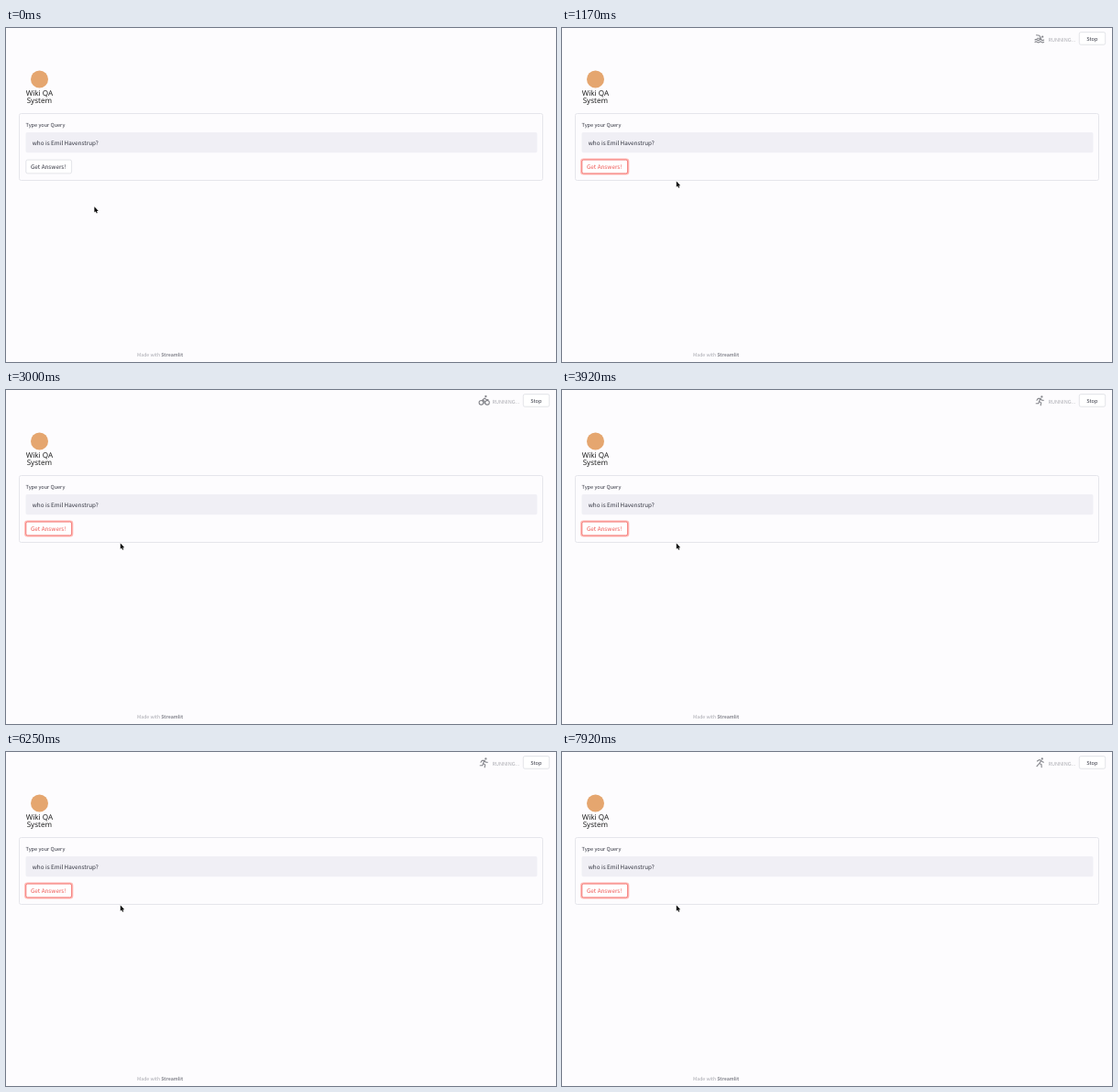
Recreate the animation shown at these times as an HTML page. Size 600 px wide and 365 px high, loop 8 s.

```html
<!DOCTYPE html>
<html lang="en">
<head>
<meta charset="utf-8">
<style>
html, body { margin: 0; width: 100%; height: 100%; overflow: hidden; background: #fdfcfe; }
svg { display: block; width: 600px; height: 365px; }
text { font: 6.35px "Noto Sans CJK JP", "Noto Sans CJK SC", "Noto Sans CJK", "Open Sans", sans-serif;
  fill: #31333f; text-rendering: geometricPrecision; }
.small { font-size: 5.6px; }
.footer { font-size: 5.2px; fill: #a3a4ab; }
.footer tspan { font-weight: 700; fill: #85868e; }
.title { font: 8.1px "Noto Sans", "Open Sans", sans-serif; text-anchor: middle; fill: #222; }
.box { fill: #fff; stroke: #dcdde3; stroke-width: .8; }
#icon { fill: none; stroke: #85868c; stroke-width: 1.1; stroke-linecap: round; stroke-linejoin: round; }
#ring { fill: none; stroke: #ffb9b5; stroke-width: 1.8; }
.hot .box { stroke: #f0605c; }
.hot text { fill: #ee5551; }
</style>
</head>
<body>
<svg viewBox="0 0 600 365">
  <circle cx="36.5" cy="56" r="9.5" fill="#e5a66f"/>
  <text class="title" x="36.4" y="73.5">Wiki QA</text>
  <text class="title" x="36.4" y="81.6">System</text>

  <rect x="14.5" y="93.5" width="571" height="73" rx="2" fill="none" stroke="#e0e0e6" stroke-width=".8"/>
  <text class="small" x="21.5" y="108">Type your Query</text>
  <rect x="21.5" y="114" width="558" height="22.3" rx="1.8" fill="#f0eff5"/>
  <text x="28.7" y="127.5">who is Emil Havenstrup?</text>
  <g id="button">
    <rect id="ring" x="21" y="143.3" width="51.4" height="16.4" rx="2.4"/>
    <rect class="box" x="21.8" y="144.1" width="49.8" height="14.8" rx="1.8"/>
    <text x="27" y="153.9">Get Answers!</text>
  </g>

  <g id="status">
    <path id="icon"/>
    <text class="small" x="530.4" y="15" style="fill:#acadb3">RUNNING...</text>
    <rect class="box" x="564.3" y="4.6" width="28.4" height="13.6" rx="1.8"/>
    <text class="small" x="572.3" y="13.6">Stop</text>
  </g>

  <text class="footer" x="143" y="358.8">Made with <tspan>Streamlit</tspan></text>
  <path id="cursor" d="M0 0V6.2L1.4 5L2.4 7.2L3.4 6.7L2.5 4.7H4.4Z" stroke="#fff" stroke-width=".8" paint-order="stroke"/>
</svg>
<script>
const LOOP = 8000, STEP = 500 / 3, CLICK = 420, STATUS = 580;
const $ = id => document.getElementById(id);
const disc = (x, y, r) => `M${x - r} ${y}a${r} ${r} 0 1 0 ${2 * r} 0a${r} ${r} 0 1 0 ${-2 * r} 0`;
const head = (x, y) => disc(x, y, .6);
const wave = y => `M516 ${y}q1.2 -1.1 2.4 0t2.4 0 2.4 0 2.4 0`;

// One pictogram per sport, shown in turn
const poses = [
  head(524.2, 9.6) + 'M517.5 7.8L520.8 8.3L522.6 11.2L518.5 11.2' + wave(13) + wave(15.4),
  head(522, 7.2) + 'M521.8 9V12.4H524.2L525.6 15.8M521.8 10.4H524.6M520 10.8A2.9 2.9 0 1 0 524 14.6',
  head(521.5, 7.4) + 'M517.5 8.5L521 9.5L524.8 8M521 9.5V12.6L523.5 16.2M521 12.6L518.8 16.2',
  head(523.4, 7.4) + 'M518 11.2L519.2 9.4L522 9.3L523.4 11.2H525.4M522 9.3L520.5 12.5L522.7 13.9L522.2 16.8M520.5 12.5L519.8 14.8H517.2',
  disc(518.4, 13.8, 2.3) + disc(525, 13.8, 2.3) + head(523.4, 7) + 'M526 10.6H524.2L522.2 9L519.8 11L522 12.3V14.6',
  head(521.6, 7.4) + 'M518.6 11.4L521.4 9.4L524.8 11M521.4 9.4L521 12.8L523.4 16.4M521 12.8L518.8 16.4',
  head(523.8, 7.4) + 'M518.4 10L520.8 8.6L522.8 9.6L520.6 12.5L523 13.6L523.2 16.6M520.6 12.5L518 15.6M522.8 9.6L525.2 11.3'
];

const ease = (t, a, b) => {
  const p = Math.min(1, Math.max(0, (t - a) / (b - a)));
  return p * p * (3 - 2 * p);
};

function draw(now) {
  const t = now % LOOP;
  const go = ease(t, 80, 380), leave = ease(t, 500, 820);
  const x = 96.4 - 37 * go + 65.4 * leave;
  const y = 195.3 - 43 * go + 15.3 * leave;
  const clicked = t >= CLICK;
  $('cursor').setAttribute('transform', `translate(${x} ${y})`);
  $('button').classList.toggle('hot', clicked || (x < 72 && y < 159));
  $('ring').style.display = clicked ? '' : 'none';
  $('status').style.display = t >= STATUS ? '' : 'none';
  $('icon').setAttribute('d', poses[Math.floor(t / STEP + .53) % poses.length]);
  requestAnimationFrame(draw);
}
draw(0);
</script>
</body>
</html>
```
